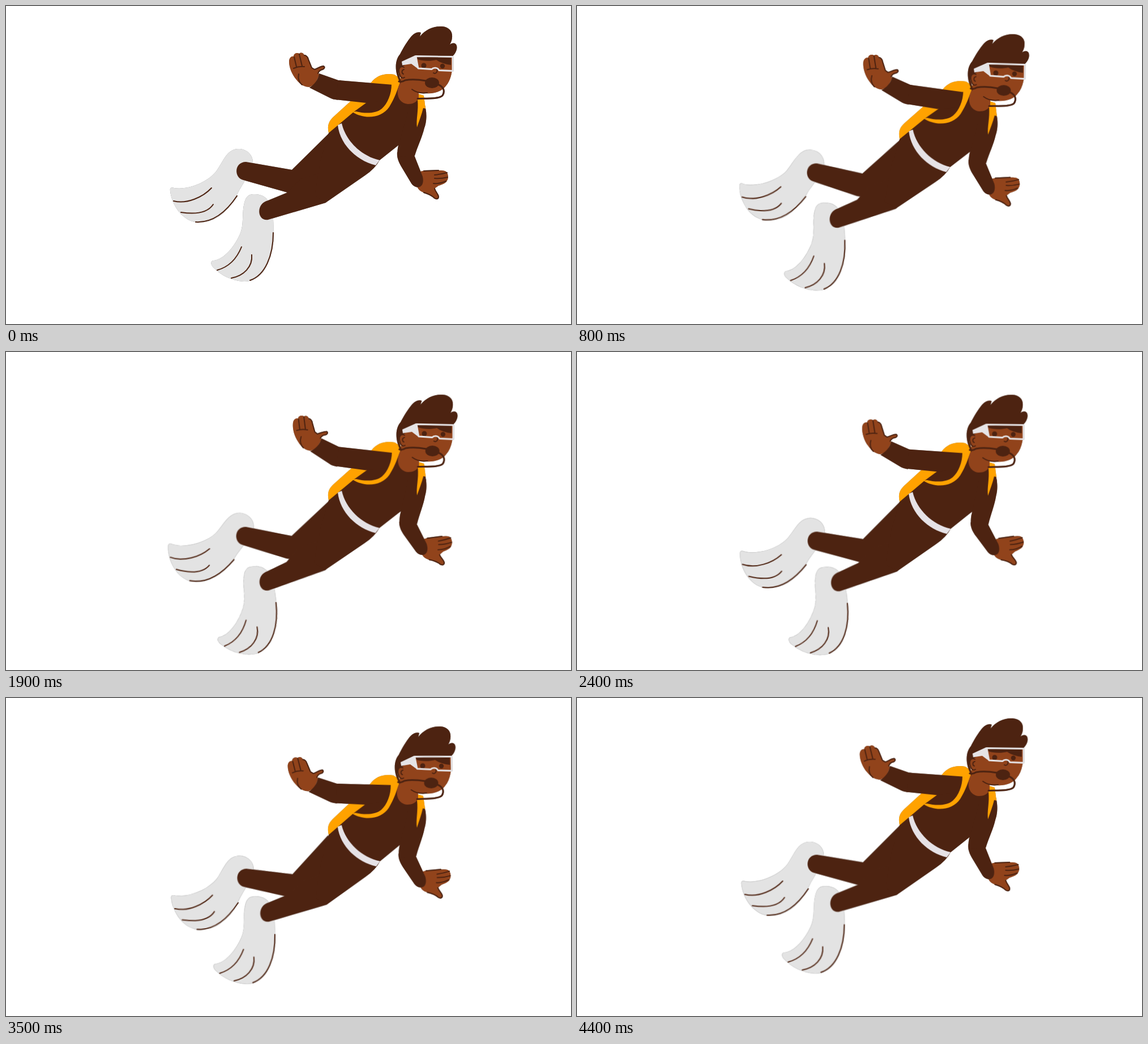
Animation, 998 px wide and 561 px high, one loop 4500 ms. Source, as an HTML page:

```html
<!DOCTYPE html>
<html lang="en">
<head>
<meta charset="utf-8">
<title>Diver</title>
<style>
html, body { margin: 0; width: 100%; height: 100%; overflow: hidden; background: #fff; }
svg { display: block; width: 100vw; height: 100vh; fill: #4d2311; }
#body { filter: drop-shadow(0 0 .6px #888); }
.skin { fill: #91431b; }
.bag { fill: #ffa200; }
.fin { fill: #e3e3e3; }
.line { fill: none; stroke: #4d2311; stroke-width: 2; stroke-linecap: round; stroke-linejoin: round; }
.tube { stroke-width: 3; }
.frame { fill: none; stroke: #e6e4e6; stroke-width: 2.8; stroke-linejoin: round; }
</style>
</head>
<body>
<!-- data-turn: pivot x, pivot y, degrees per sin, degrees per (1 - cos) -->
<svg viewBox="0 0 998 561">
<g id="body">
  <g data-turn="600 290 2.1 0">
    <g data-turn="425 292 0 2.8">
      <path class="fin" d="M436 277C437 262 424 251 409 252C389 254 384 274 371 292C356 311 321 325 297 321C292 319 289 321 290 326C292 350 312 382 342 382C376 381 398 356 412 325L424 305Z"/>
      <path class="line" d="M296 344C320 350 348 337 363 321M309 364C335 368 356 365 366 350M335 381C367 383 390 362 408 335"/>
    </g>
    <path d="M424 275L505 289L571 224L600 290L550 335L497 329L419 307C402 303 403 275 424 275Z"/>
  </g>
  <g data-turn="565 340 -2.15 -1.45">
    <g data-turn="460 360 0 -1.7">
      <path class="fin" d="M437 332C452 331 464 339 467 352L472 376C474 410 470 445 455 468C446 480 432 487 420 486C400 485 380 476 366 461C361 456 361 449 367 449C385 447 403 425 413 403C421 385 416 365 421 347C424 335 430 332 437 332Z"/>
      <path class="line" d="M373 466C395 460 408 445 416 425M398 480C420 476 436 460 434 439M431 484C458 475 472 440 472 400"/>
    </g>
    <path d="M463 343L497 329L520 305L570 290L585 320L565 347L463 377C443 380 441 348 463 343Z"/>
  </g>

  <path class="bag" d="M570 224C567 210 570 203 580 194L645 135C655 122 670 118 686 121L697 128L690 145L636 174Z"/>
  <path d="M570 224L614 187L636 171L681 139L695 135L738 165L742 190L722 225L694 245L660 272Q652 287 634 299L566 346L545 335L555 275Z"/>
  <path fill="#e6e2e6" d="M586 210L593 207C600 238 628 265 660 272L653 281C620 273 590 245 586 210Z"/>

  <g data-turn="733 195 0 -1.9">
    <g data-turn="706 265 0 -1">
      <path class="skin" d="M732 292C742 289 755 291 764 290C770 290 777 290 779 294C781 297 782 304 779 308C778 312 771 315 764 317L757 322C758 327 763 331 764 336C764 341 760 341 757 339C752 334 745 331 738 329C732 327 728 324 726 318Z"/>
      <path class="line" d="M757 298Q768 297 779 294M757 304Q768 305 780 302M755 313Q766 314 777 309M738 291L764 290M757 322C758 327 763 331 764 336C764 341 760 341 757 339C752 334 745 331 738 329"/>
      <path d="M691 258C690 268 694 276 698 283L716 313C720 319 727 321 731 319C736 317 738 310 736 301L721 263Q705 245 691 258Z"/>
    </g>
    <path d="M715 170L737 168C745 185 743 205 739 215C735 232 728 245 722 264L692 266C690 258 693 245 694 243Z"/>
  </g>

  <g data-turn="660 155 2.4 0">
    <g data-turn="580 148 0 2.6">
      <path class="skin" d="M536 143C528 143 520 139 513 130C505 121 500 108 500 98C500 91 505 88 508 89C508 83 515 82 518 84C521 81 526 83 527 87C530 87 533 90 534 94L540 109L545 112C551 110 556 106 561 106C564 108 562 111 559 112C553 114 551 117 553 122L546 138Z"/>
      <path class="line" d="M509 90L513 107M518 85L523 106M508 110Q517 106 527 107M517 120C515 129 518 135 523 139M527 87C530 87 533 90 534 94L540 109L545 112C551 110 556 106 561 106C564 108 562 111 559 112C554 113 552 116 551 119"/>
      <path d="M592 131.500L587 131L553 119C552 130 544 139 536 144L572 162Q577 165 586 165.500Z"/>
    </g>
    <path d="M587 131L684 139V165L636 171L582 165Z"/>
  </g>

  <path class="bag" d="M612 187C632 200 663 199 677 178C688 160 690 150 697 133L686 122L681 138C681 155 674 172 664 181C654 190 634 190 618 186Z"/>
  <path class="bag" d="M728 155L738 158L741 181L737 180C734 192 730 202 726 214C724 200 729 185 727 165Z"/>

  <path class="skin" d="M697 90L788 90C790 110 787 130 777 141C770 151 752 158 729 152V162C726 170 718 173 710 173C694 172 687 155 695 138L697 128Z"/>
  <path d="M697 137C685 115 687 95 696 85C700 77 706 66 714 56C721 47 728 45 733 47L731 54C740 42 755 35 770 36C783 37 789 45 788 55C788 60 786 64 784 68C789 64 795 65 796 70C798 77 793 86 786 91L724 90L703 105C695 108 692 114 694 121L698 133Z"/>
  <path d="M726 90H786V104C777 103 767 100 760 95C749 98 735 97 727 94Z"/>
  <ellipse class="skin" cx="700" cy="117" rx="6.500" ry="10"/>
  <path class="line" d="M703 108C696 104 692 112 695 120C697 127 701 128 704 126M703 112C698 113 699 119 702 120M760 109C764 116 759 121 755 118M717 147C725 153 736 154 744 153"/>
  <circle cx="738" cy="105" r="4.500"/>
  <circle cx="771" cy="106" r="4.200"/>
  <path fill="#e6e4e6" d="M699 98L723 87L728 111L716 102L700 104.500Z"/>
  <path class="frame" d="M724 88.500L789 89.500V114.500L765 113.500C762 108 755 108 752 111.500L728 110Z"/>
  <path class="line tube" d="M694 133Q699 135 705 131C716 129 730 130 742 132M762 138C773 142 776 150 771 158C765 164 745 163 727 163.500"/>
  <ellipse cx="752.500" cy="135.500" rx="12.500" ry="9.500"/>
</g>
</svg>
<script>
const PERIOD = 4500, STEP = 100;
const body = document.getElementById('body');
const joints = [...document.querySelectorAll('[data-turn]')].map(el => [el, ...el.dataset.turn.split(' ').map(Number)]);

function draw(now) {
  const time = Math.floor(now % PERIOD / STEP) * STEP;
  const phase = time / PERIOD * 2 * Math.PI;
  const sway = Math.sin(phase), sink = 1 - Math.cos(phase);
  body.setAttribute('transform', `translate(${0.4 * sway} ${20.2 * sink + 0.6 * sway}) rotate(${0.95 * sway} 650 200)`);
  for (const [el, x, y, a, b] of joints)
    el.setAttribute('transform', `rotate(${a * sway + b * sink} ${x} ${y})`);
}

const start = performance.now();
function tick() {
  draw(performance.now() - start);
  requestAnimationFrame(tick);
}
tick();
</script>
</body>
</html>
```
